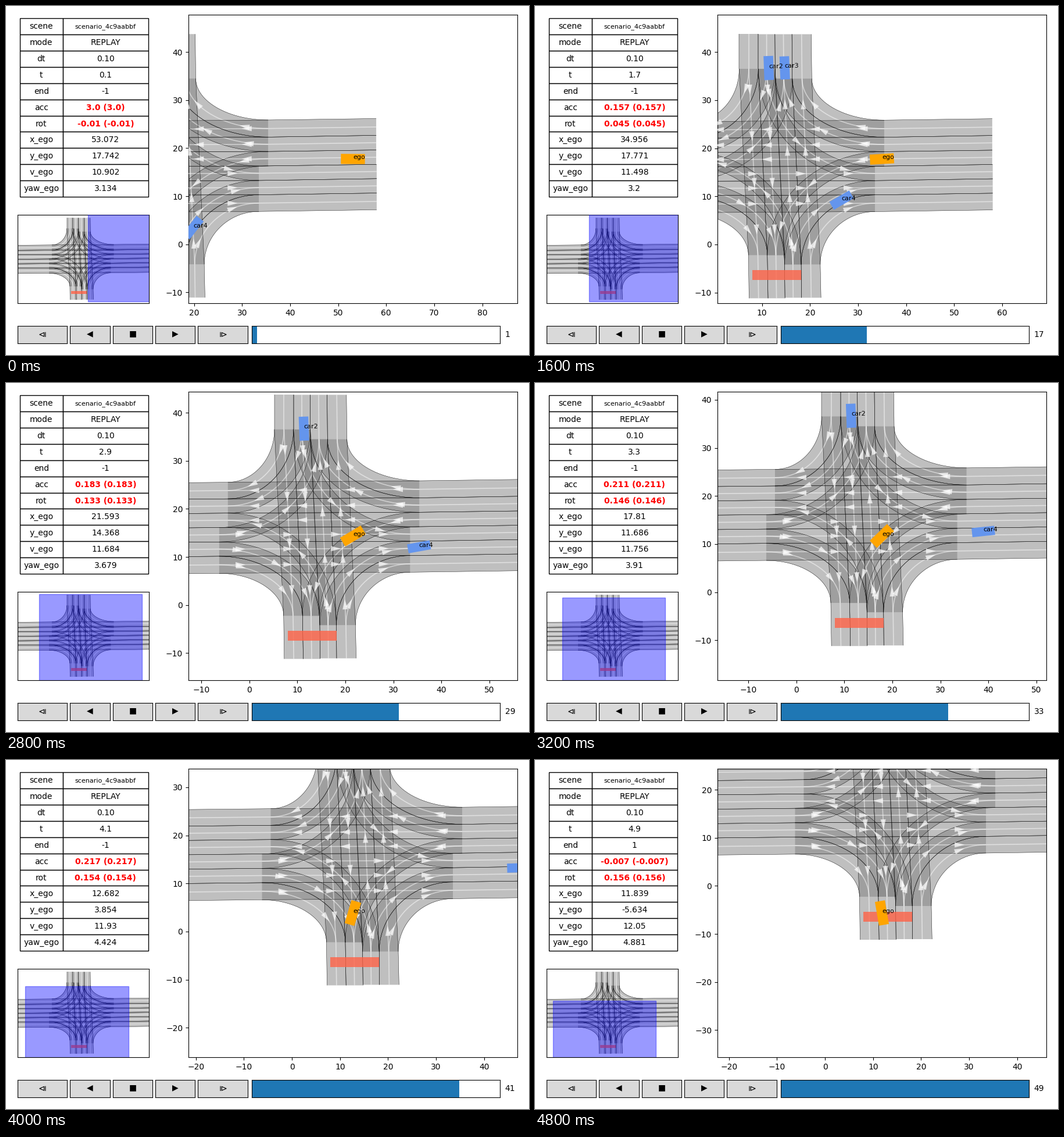
These frames come from a looping animation (900 by 600 pixels, 4900 ms). A matplotlib script:

```python
import numpy as np
import matplotlib.pyplot as plt
from matplotlib.animation import FuncAnimation
from matplotlib.collections import LineCollection, PolyCollection
from matplotlib.patches import Polygon, Rectangle
from matplotlib.ticker import MultipleLocator

W, H, STEPS = 900, 600, 49
HALF_H = 30
HALF_W = HALF_H * 566 / 496

plt.rcParams["font.family"] = "DejaVu Sans"
fig = plt.figure(figsize=(W / 100, H / 100), dpi=100, facecolor="white")


def panel(x0, y0, x1, y1, color="white", ticks=False):
    """Axes from pixel corners measured from the top left."""
    ax = fig.add_axes([x0 / W, 1 - y1 / H, (x1 - x0) / W, (y1 - y0) / H],
                      facecolor=color)
    if not ticks:
        ax.set_xticks([])
        ax.set_yticks([])
    return ax


# ---- road network: edges run from the right to the left of the travel direction

def across_x(x, ys):
    return [np.array([x, y]) for y in ys]


def across_y(y, xs):
    return [np.array([x, y]) for x in xs]


ENTRY = {
    "E": across_x(35.43, [25.85, 22.3, 19.3, 16.3]),
    "W": across_x(-6.26, [6.6, 10.15, 13.13, 16.12]),
    "N": across_y(36.52, [5.25, 9.22, 12.72]),
    "S": across_y(-4.18, [22.12, 18.15, 14.7]),
}
EXIT = {
    "E": across_x(33.5, [6.83, 10.3, 13.27, 16.27]),
    "W": across_x(-4.45, [25.54, 22.09, 19.12, 16.15]),
    "N": across_y(34.5, [20.35, 16.3, 12.75]),
    "S": across_y(-2.25, [7.17, 11.1, 14.67]),
}
ARMS = [
    (ENTRY["E"], across_x(57.92, [26.15, 22.65, 19.6, 16.62])),
    (EXIT["E"], across_x(58.02, [7.17, 10.65, 13.65, 16.62])),
    (ENTRY["W"], [p + (-23.74, -0.25) for p in ENTRY["W"]]),
    (EXIT["W"], [p + (-25.55, -0.25) for p in EXIT["W"]]),
    (ENTRY["N"], across_y(43.72, [5.25, 9.22, 12.68])),
    (EXIT["N"], across_y(43.72, [20.24, 16.22, 12.68])),
    (ENTRY["S"], across_y(-11.08, [22.27, 18.2, 14.77])),
    (EXIT["S"], across_y(-11.2, [7.3, 11.25, 14.77])),
]
OPPOSITE = dict(E="W", W="E", N="S", S="N")
RIGHT = dict(E="N", N="W", W="S", S="E")
LEFT = dict(E="S", S="W", W="N", N="E")


def curve(p, q, start, end, k=0.55):
    t = np.linspace(0, 1, 25)[:, None]
    if (start in "EW") == (end in "EW"):
        return p + (q - p) * t
    corner = np.array([q[0], p[1]] if start in "EW" else [p[0], q[1]])
    a, b = p + k * (corner - p), q + k * (corner - q)
    u = 1 - t
    return u**3 * p + 3 * u * u * t * a + 3 * u * t * t * b + t**3 * q


def routes():
    """Straight on from every lane, right from the outer two, left from the inner."""
    for s in "EWNS":
        lanes = len(ENTRY[s]) - 1
        for i in range(lanes):
            yield s, i, OPPOSITE[s], i
        for i in range(2):
            yield s, i, RIGHT[s], i
        yield s, lanes - 1, LEFT[s], len(EXIT[LEFT[s]]) - 2


def arrows(mid):
    """Arrow heads spaced about ten metres apart along a centre line."""
    seg = np.diff(mid, axis=0)
    dist = np.r_[0, np.cumsum(np.hypot(*seg.T))]
    count = max(1, round(dist[-1] / 10))
    for d in (np.arange(count) + 0.5) * dist[-1] / count:
        p = np.array([np.interp(d, dist, mid[:, 0]), np.interp(d, dist, mid[:, 1])])
        u = seg[min(np.searchsorted(dist, d) - 1, len(seg) - 1)]
        u = u / np.hypot(*u)
        n = np.array([-u[1], u[0]])
        base = p - 1.55 * u
        yield [p + 0.55 * u, base + 0.55 * n, base - 0.55 * n]


fills, borders, centres, heads = [], [], [], []


def add_lane(right, left, marked=False):
    mid = (right + left) / 2
    fills.append(np.vstack([right, left[::-1]]))
    borders.extend([right, left])
    centres.append(mid)
    if marked:
        heads.extend(arrows(mid))


for near, far in ARMS:
    sides = [np.array(pair) for pair in zip(near, far)]
    for right, left in zip(sides, sides[1:]):
        add_lane(right, left)
for s, i, e, j in routes():
    right, left = (curve(ENTRY[s][i + n], EXIT[e][j + n], s, e) for n in (0, 1))
    add_lane(right, left, True)


def draw_map(ax, with_heads):
    ax.add_collection(PolyCollection(fills, facecolors="gray", edgecolors="none",
                                     alpha=0.5, zorder=1), autolim=False)
    ax.add_collection(LineCollection(centres, colors="white", linewidths=1.2,
                                     alpha=0.5, zorder=2), autolim=False)
    ax.add_collection(LineCollection(borders, colors="black", linewidths=0.32,
                                     zorder=3), autolim=False)
    if with_heads:
        ax.add_collection(PolyCollection(heads, facecolors="white", edgecolors="none",
                                         alpha=0.7, zorder=4), autolim=False)
    ax.add_patch(Rectangle((7.99, -7.4), 10.16, 2.05, facecolor="tomato",
                           edgecolor="none", alpha=0.8, zorder=5))


# ---- motion

KNOTS = 0.1 + 0.8 * np.arange(7)


def track(values):
    """Smooth curve through values given every 0.8 s."""
    v = np.array(values)
    m = np.gradient(v, 0.8, edge_order=2) * 0.8

    def at(t):
        s = (t - 0.1) / 0.8
        i = int(np.clip(np.floor(s + 1e-9), 0, len(v) - 2))
        s -= i
        return (v[i] * (1 + 2 * s) * (1 - s)**2 + m[i] * s * (1 - s)**2
                + v[i + 1] * s * s * (3 - 2 * s) + m[i + 1] * s * s * (s - 1))
    return at


ego_x = track([53.072, 44.092, 34.956, 25.87, 17.81, 12.682, 11.839])
ego_y = track([17.742, 17.847, 17.771, 16.26, 11.686, 3.854, -5.634])
ego_yaw = track([3.134, 3.133, 3.2, 3.478, 3.91, 4.424, 4.881])
ego_rot = track([-0.01, 0.005, 0.045, 0.113, 0.146, 0.154, 0.156])
car4_x = track([19.8, 22.56, 26.55, 32.14, 38.92, 47.16, 55.9])
car4_y = track([3.47, 6.42, 9.21, 11.42, 12.62, 13.24, 13.45])
car4_yaw = track([52, 43.5, 30, 15.5, 6, 1.5, 1])


def ego_v(t):
    return np.interp(t, [0.1, 0.2, *KNOTS[1:]],
                     [10.902, 11.202, 11.358, 11.498, 11.613, 11.756, 11.93, 12.05])


def ego_acc(t):
    return np.interp(t, [0.1, 0.2, *KNOTS[1:6], 4.5, 4.9],
                     [3.0, 0.23, 0.2, 0.157, 0.155, 0.211, 0.217, 0.215, -0.007])


def car2(t):
    return 11.39, 36.69, np.radians(-88)


def car3(t):
    s = t - 0.9
    return 14.3 + 0.85 * s - 0.4 * s * s, 31.52 + 6.5 * s, np.radians(83 + 11.5 * s)


def car4(t):
    return car4_x(t), car4_y(t), np.radians(car4_yaw(t))


def ego(t):
    return ego_x(t), ego_y(t), ego_yaw(t)


class Car:
    def __init__(self, ax, name, pose, color, length, width, until=9):
        self.pose, self.until = pose, until
        self.shape = np.array([[1, 1], [-1, 1], [-1, -1], [1, -1]]) * (length / 2, width / 2)
        self.body = ax.add_patch(Polygon(self.shape, facecolor=color,
                                         edgecolor="none", zorder=6))
        self.label = ax.text(0, 0, name, fontsize=8, clip_on=True, zorder=7)

    def move(self, t):
        x, y, a = self.pose(t)
        turn = np.array([[np.cos(a), np.sin(a)], [-np.sin(a), np.cos(a)]])
        self.body.set_xy(self.shape @ turn + (x, y))
        self.label.set_position((x, y))
        for part in (self.body, self.label):
            part.set_visible(t < self.until)


# ---- panels

view = panel(314, 15, 880, 511, ticks=True)
view.xaxis.set_major_locator(MultipleLocator(10))
view.yaxis.set_major_locator(MultipleLocator(10))
draw_map(view, True)
cars = [
    Car(view, "car2", car2, "cornflowerblue", 5, 2),
    Car(view, "car3", car3, "cornflowerblue", 4.8, 2, until=2.05),
    Car(view, "car4", car4, "cornflowerblue", 4.75, 1.9),
    Car(view, "ego", ego, "orange", 5, 2.1),
]

mini = panel(20, 359, 246, 511)
draw_map(mini, False)
mini.set_xlim(-26.45, 58.0)
mini.set_ylim(-13.54, 45.75)
window = mini.add_patch(Rectangle((0, 0), 66.3, 2 * HALF_H, color="blue",
                                  alpha=0.4, zorder=8))

ROWS = ["scene", "mode", "dt", "t", "end", "acc", "rot",
        "x_ego", "y_ego", "v_ego", "yaw_ego"]
info = panel(24, 21.1, 245, 328.1)
info.axis("off")
table = info.table(cellText=[[name, ""] for name in ROWS], cellLoc="center",
                   colWidths=[1, 2], bbox=[0, 0, 1, 1])
table.auto_set_font_size(False)
table.set_fontsize(10)
cell = {name: table[i, 1].get_text() for i, name in enumerate(ROWS)}
cell["scene"].set(text="scenario_4c9aabbf", fontsize=8)
cell["mode"].set_text("REPLAY")
cell["dt"].set_text("0.10")
for name in ("acc", "rot"):
    cell[name].set(color="red", fontweight="bold")

BUTTONS = [(20, 105, "\u29cf"), (110, 179, "\u25c0"), (184, 252, "\u25a0"),
           (257, 325, "\u25b6"), (330, 416, "\u29d0")]
for x0, x1, sign in BUTTONS:
    button = panel(x0, 550, x1, 580, "0.85")
    button.text(0.5, 0.5, f"${sign}$", ha="center", va="center",
                transform=button.transAxes)

slider = panel(423, 550, 850, 580)
slider.set_xlim(0, STEPS)
slider.set_ylim(0, 1)
bar = slider.add_patch(Rectangle((0, 0), 1, 1, facecolor="#1f77b4", edgecolor="none"))
count = slider.text(1.02, 0.5, "", transform=slider.transAxes, va="center", ha="left")


def short(value):
    return str(round(float(value), 3))


def update(i):
    step = i + 1
    t = step / 10
    x, y, yaw = ego(t)
    view.set_xlim(x - HALF_W, x + HALF_W)
    view.set_ylim(y - HALF_H, y + HALF_H)
    window.set_xy((x - HALF_W, y - HALF_H))
    for car in cars:
        car.move(t)

    acc, rot = short(ego_acc(t)), short(ego_rot(t))
    values = dict(t=f"{t:.1f}", end="1" if step == STEPS else "-1",
                  acc=f"{acc} ({acc})", rot=f"{rot} ({rot})", x_ego=short(x),
                  y_ego=short(y), v_ego=short(ego_v(t)), yaw_ego=short(yaw))
    for name, value in values.items():
        cell[name].set_text(value)
    bar.set_width(step)
    count.set_text(str(step))
    return []


anim = FuncAnimation(fig, update, frames=STEPS, interval=100, repeat=True)
plt.show()
```
